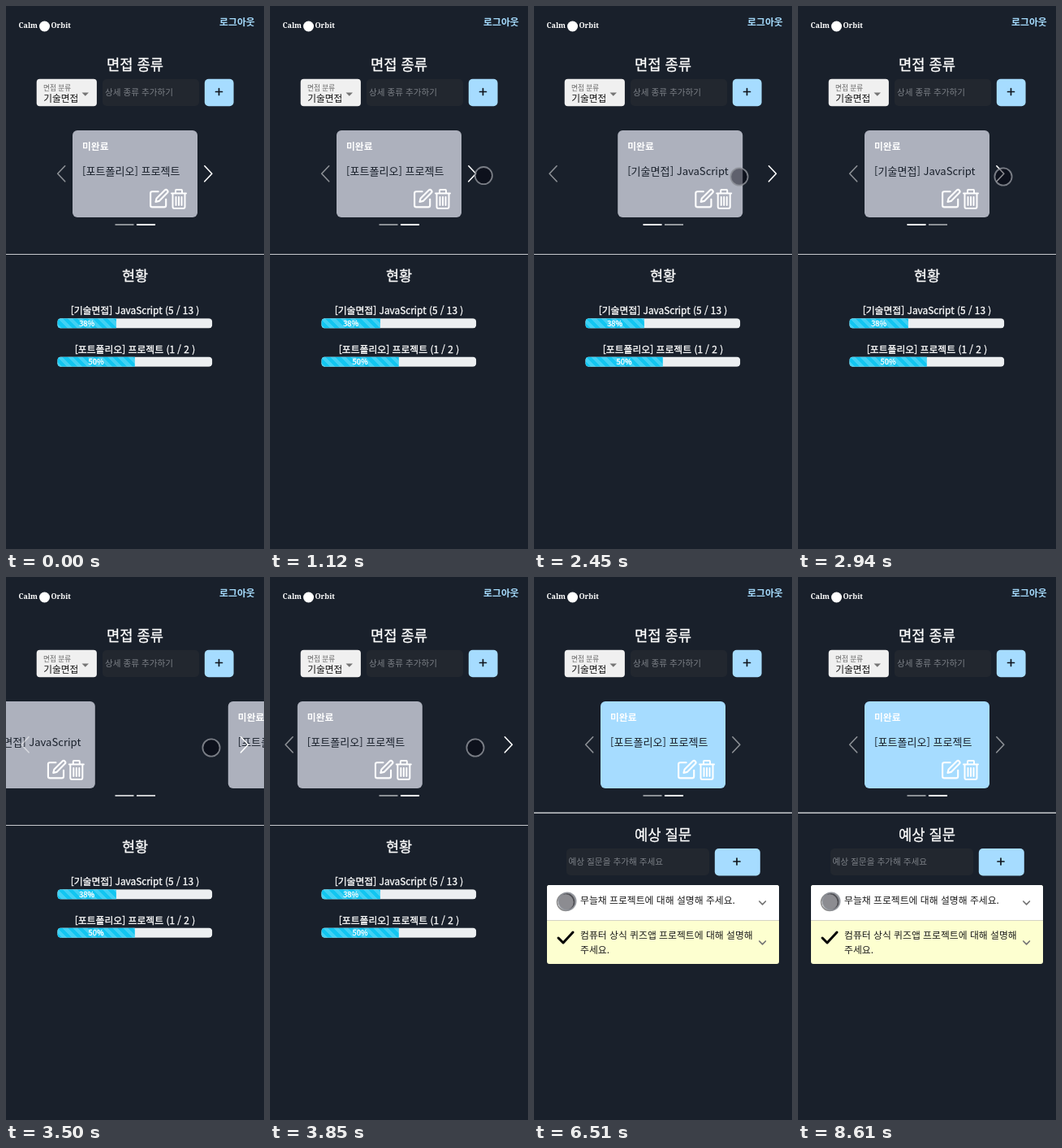
Animation of 318 by 668 pixels, one loop 8.75 s. Source, as an HTML page:

```html
<!DOCTYPE html>
<html lang="ko">
<head>
<meta charset="utf-8">
<title>면접 종류</title>
<style>
  html, body { margin: 0; width: 100%; height: 100%; overflow: hidden; background: #19202b; }
  svg { display: block; width: 318px; height: 668px; }
  text { font-family: "Noto Sans CJK KR", "Noto Sans KR", "Noto Sans CJK", sans-serif; white-space: pre; }
  .brand { font-family: "Noto Serif", serif; font-weight: 700; }
  .medium { stroke: #fff; stroke-width: .3px; }
  .line { fill: none; stroke-linecap: round; stroke-linejoin: round; }
</style>
</head>
<body>
<svg id="stage" viewBox="0 0 318 668"></svg>
<script>
const LOOP = 8750, STEP = 70;
const BLUE = '#a6dcff', GREY = '#adb1bd', FIELD = '#22272f', INK = '#19202b', YELLOW = '#fdffd0';
const STRIPE = 12.35, SLIDE_MS = 600, WIDE = 318, IDLE = 213;
const SLIDES = [2050, 3300];
const OPEN_AT = 4690, BLUR_AT = 6090;
const CHECK = { on: 6790, off: 8120 }, DONE = { on: 6930, off: 8610 };

// Text placed by its vertical centre
const text = (x, cy, size, str, fill = '#fff', more = '') =>
  `<text x="${x}" y="${cy + size * 0.38}" font-size="${size}" fill="${fill}" ${more}>${str}</text>`;
const title = (cy, size, str) => text(159, cy, size, str, '#fff', 'class="medium" text-anchor="middle"');
const box = (x, y, w, h, r, fill, more = '') =>
  `<rect x="${x}" y="${y}" width="${w}" height="${h}" rx="${r}" fill="${fill}" ${more}/>`;
const line = (d, color, width, more = '') =>
  `<path class="line" d="${d}" stroke="${color}" stroke-width="${width}" ${more}/>`;
const plus = (x, y) => line(`M${x - 4} ${y}h8M${x} ${y - 4}v8`, '#10151d', 1.7);
const tick = (y, more = '') => line(`M30 ${y + 1}l6 6 12-13`, '#000', 3, more);
const chevron = y => line(`M277.8 ${y - 2}l3.8 3.8 3.8-3.8`, '#757575', 1.7);

const icons = `
  <g class="line" stroke="#fff" stroke-width="2">
    <g transform="translate(94 71) scale(1.06)">
      <path d="M11 4H4a2 2 0 0 0-2 2v14a2 2 0 0 0 2 2h14a2 2 0 0 0 2-2v-7"/>
      <path d="M18.5 2.5a2.1 2.1 0 0 1 3 3L12 15l-4 1 1-4z"/>
    </g>
    <path d="M122 77.500h18M127 77v-3q0-1 1-1h6q1 0 1 1v3M123.500 78v16q0 2 2 2h11q2 0 2-2V78M127.500 82v10M131 82v10M134.500 82v10"/>
  </g>`;

const card = (id, label) => `
  <g id="${id}">
    <rect class="face" width="154" height="107" rx="6" fill="${GREY}"/>
    ${text(12, 20, 11.8, '미완료', '#fff', 'class="state" font-weight="700"')}
    ${text(12, 50, 13.05, label, INK)}
    ${icons}
  </g>`;

const bar = (y, pct) => `
  <g transform="translate(63.3 ${y})" clip-path="url(#track)">
    ${box(0, 0, 191, STRIPE, 0, '#eceff1')}
    ${box(0, 0, 1.91 * pct, STRIPE, 0, '#12c6f1')}
    ${box(0, 0, 1.91 * pct, STRIPE, 0, 'url(#stripes)')}
    ${text(0.955 * pct, 6, 9.3, pct + '%', '#fff', 'class="medium" text-anchor="middle"')}
  </g>`;

document.getElementById('stage').innerHTML = `
  <defs>
    <clipPath id="track"><rect width="191" height="${STRIPE}" rx="4.600"/></clipPath>
    <linearGradient id="stripes" gradientUnits="userSpaceOnUse" spreadMethod="repeat"
      x1="0" y1="${STRIPE}" x2="${STRIPE / 2}" y2="${STRIPE / 2}">
      <stop offset="0" stop-color="#fff" stop-opacity=".2"/>
      <stop offset=".5" stop-color="#fff" stop-opacity=".2"/>
      <stop offset=".5" stop-color="#fff" stop-opacity="0"/>
      <stop offset="1" stop-color="#fff" stop-opacity="0"/>
    </linearGradient>
  </defs>
  ${box(0, 0, 318, 668, 0, INK)}
  <text class="brand" x="39" y="27" font-size="9" fill="#fff" text-anchor="end">Calm</text>
  <circle cx="47.5" cy="25" r="6.500" fill="#fff"/>
  <text class="brand" x="55.500" y="27" font-size="9" fill="#fff">Orbit</text>
  ${text(263, 19.5, 11.9, '로그아웃', BLUE, 'font-weight="700"')}
  ${title(72, 17.7, '면접 종류')}
  ${box(37.7, 89.7, 74.2, 33.6, 4, '#f0f0f0')}
  ${text(46, 101, 8.6, '면접 분류', '#666')}
  ${text(46.3, 114, 11.7, '기술면접', '#111')}
  <path d="M93.500 106.500h8.500l-4.250 4.250z" fill="#757575"/>
  ${box(119, 90, 119, 33, 5, FIELD)}
  ${text(122, 106, 10.6, '상세 종류 추가하기', '#7c8087')}
  ${box(244.8, 89.7, 35.8, 33.6, 5, BLUE)}
  ${plus(262.5, 105.5)}

  ${card('script', '[기술면접] JavaScript')}
  ${card('folio', '[포트폴리오] 프로젝트')}
  ${line('M4.500-9.500l-9 9.500 9 9.500', '#fff', 1.6, 'id="prev" opacity=".5"')}
  ${line('M-4.500-9.500l9 9.500-9 9.500', '#fff', 1.6, 'id="next"')}
  ${box(134.5, 268, 23, 2, 0, '#fff', 'id="dot0"')}
  ${box(161, 268, 23, 2, 0, '#fff', 'id="dot1"')}

  <g id="status">
    ${box(0, 305, 318, 1, 0, '#c6c8cd')}
    ${title(331, 17.5, '현황')}
    ${title(374, 11.85, '[기술면접] JavaScript (5 / 13 )')}
    ${bar(384.2, 38)}
    ${title(422, 11.85, '[포트폴리오] 프로젝트 (1 / 2 )')}
    ${bar(431.5, 50)}
  </g>

  <g id="questions">
    ${box(0, 289.5, 318, 1.3, 0, '#e4e5e8')}
    ${title(317, 17.7, '예상 질문')}
    ${box(40, 334, 176, 33, 5, FIELD)}
    ${text(42.5, 350, 10.65, '예상 질문을 추가해 주세요', '#7c8087')}
    ${box(222.8, 334, 56, 33.4, 5, BLUE)}
    ${plus(250, 350)}
    ${box(16, 379, 286, 97, 3, YELLOW)}
    <path id="row" d="M16 422.500V382q0-3 3-3h280q3 0 3 3v40.500z"/>
    ${box(16, 422, 286, 1, 0, '#d4d4c4')}
    <circle id="ring" cx="39" cy="400" r="10.500" fill="none" stroke="#8c8c8c" stroke-width="1.600"/>
    ${tick(400, 'id="tick"')}
    ${text(57, 397, 11.85, '무늘채 프로젝트에 대해 설명해 주세요.', '#1c1c1c')}
    ${chevron(401)}
    ${tick(443)}
    ${text(57, 440, 11.85, '컴퓨터 상식 퀴즈앱 프로젝트에 대해 설명해', '#1c1c1c')}
    ${text(57, 458, 11.85, '주세요.', '#1c1c1c')}
    ${chevron(450)}
  </g>

  <circle id="cursor" r="10.600" fill="rgba(0,0,10,.45)" stroke="rgba(140,143,150,.85)" stroke-width="1.800"/>`;

const $ = id => document.getElementById(id);
const set = (id, name, value) => $(id).setAttribute(name, value);
const show = (id, on) => set(id, 'visibility', on ? 'visible' : 'hidden');
const clamp = v => Math.max(0, Math.min(1, v));
const within = (t, span) => t >= span.on && t < span.off;

// Cubic bezier (x1, 0, x2, 1), solved by bisection
function ease(p, x1 = 0.42, x2 = 0.58) {
  p = clamp(p);
  let lo = 0, hi = 1, s = p;
  for (let i = 0; i < 24; i++) {
    s = (lo + hi) / 2;
    const x = 3 * x1 * s * (1 - s) ** 2 + 3 * x2 * s * s * (1 - s) + s ** 3;
    if (x < p) lo = s; else hi = s;
  }
  return 3 * s * s - 2 * s ** 3;
}

// time, x, y
const path = [
  [70, 285, 648], [910, 266, 232], [1260, 262, 197], [1750, 253, 210],
  [3920, 253, 210], [4500, 143.5, 198], [5300, 143.5, 198],
  [5740, 64, 408], [6070, 64, 408], [6370, 41, 399], [LOOP, 41, 399]
];

function pointAt(t) {
  const i = Math.max(1, path.findIndex(k => k[0] >= t));
  const [t0, x0, y0] = path[i - 1], [t1, x1, y1] = path[i];
  const p = ease((t - t0) / (t1 - t0));
  return [x0 + (x1 - x0) * p, y0 + (y1 - y0) * p];
}

function carousel(t) {
  const turn = SLIDES.findIndex(s => t >= s && t < s + SLIDE_MS);
  const moving = turn >= 0;
  const width = moving ? WIDE : IDLE;
  const left = 159 - width / 2;
  set('prev', 'transform', `translate(${left + width * 0.075 - 0.3} 206.300)`);
  set('next', 'transform', `translate(${left + width * 0.925 - 0.2} 206.300)`);

  const place = (id, x) => set(id, 'transform', `translate(${x} 153)`);
  const current = t >= SLIDES[0] + SLIDE_MS && t < SLIDES[1] ? 'script' : 'folio';
  if (moving) {
    const shift = WIDE * ease((t - SLIDES[turn]) / SLIDE_MS);
    place(turn ? 'script' : 'folio', 29.5 - shift);
    place(turn ? 'folio' : 'script', 29.5 + WIDE - shift);
  } else {
    place(current, 82);
  }
  show('script', moving || current === 'script');
  show('folio', moving || current === 'folio');

  const first = ease((t - SLIDES[0]) / SLIDE_MS, 0.25, 0.25) - ease((t - SLIDES[1]) / SLIDE_MS, 0.25, 0.25);
  set('dot0', 'opacity', 0.5 + 0.5 * first);
  set('dot1', 'opacity', 1 - 0.5 * first);
  set('next', 'opacity', 1 - 0.5 * clamp((t - BLUR_AT) / 150));
}

const face = document.querySelector('#folio .face');
const state = document.querySelector('#folio .state');

function draw(t) {
  carousel(t);
  const open = t >= OPEN_AT, checked = within(t, CHECK);
  face.setAttribute('fill', t >= 4620 ? BLUE : GREY);
  state.textContent = within(t, DONE) ? '준비 완료!' : '미완료';
  show('status', !open);
  show('questions', open);
  set('row', 'fill', checked ? YELLOW : '#fff');
  set('ring', 'opacity', checked ? 0 : 1);
  set('tick', 'opacity', checked ? 1 : 0);
  set('stripes', 'gradientTransform', `translate(${-STRIPE * (t % 1000) / 1000} 0)`);
  show('cursor', t >= 70);
  const [x, y] = pointAt(t);
  set('cursor', 'transform', `translate(${x} ${y})`);
}

function tickFrame() {
  const t = performance.now() % LOOP;
  draw(Math.floor(t / STEP) * STEP);
  requestAnimationFrame(tickFrame);
}
tickFrame();
</script>
</body>
</html>
```
